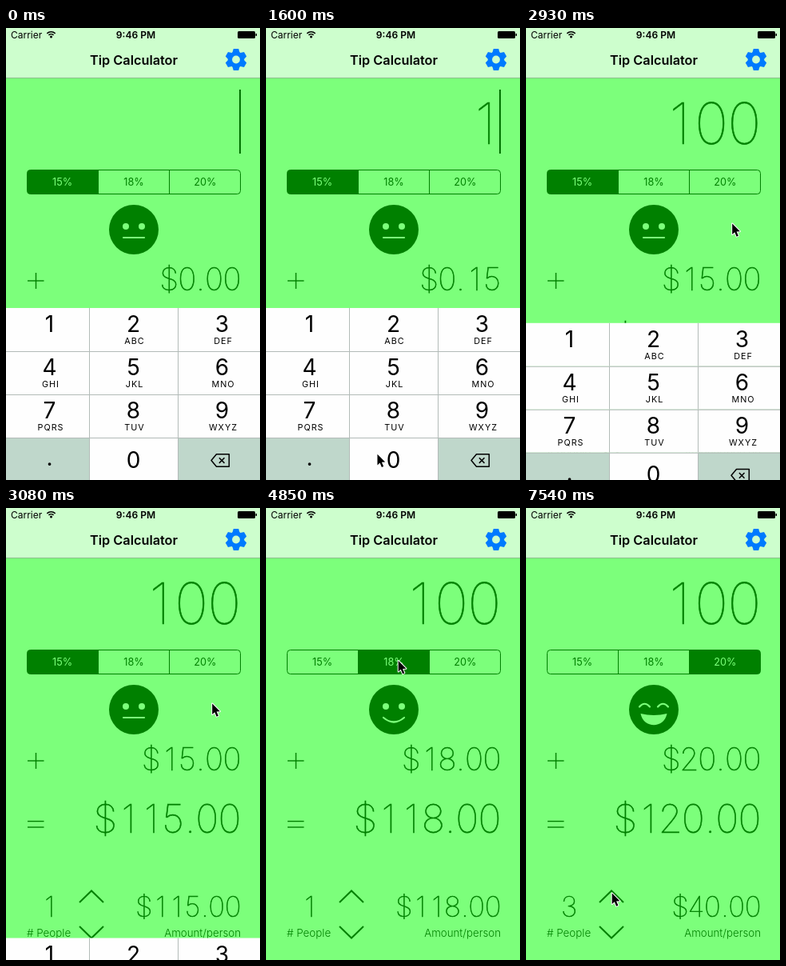
An HTML page with a canvas that plays this animation: 318 px wide and 565 px high, repeating every 8 s.

```html
<!DOCTYPE html>
<html lang="en">
<head>
<meta charset="utf-8">
<title>Tip Calculator</title>
<style>
html, body { margin: 0; width: 100%; height: 100%; overflow: hidden; background: #7cff7b; }
canvas { display: block; width: 318px; height: 565px; }
</style>
</head>
<body>
<canvas id="stage"></canvas>
<script>
const W = 318, H = 565, LOOP = 8000;
const BG = '#7cff7b', GREEN = '#008000', BAR = '#cdfecd', KEY = '#fefefe', GREY = '#bfd7cb', LINE = '#b3bbb8';
const RATES = [15, 18, 20];
const HOLD = 145, HOVER = 100, TRAVEL = 450, SLIDE = 400, KEYS_H = 216;
const canvas = document.getElementById('stage');
const ratio = window.devicePixelRatio || 1;
canvas.width = W * ratio;
canvas.height = H * ratio;
const c = canvas.getContext('2d');

// The whole session follows from these taps; a tap takes effect on release.
const taps = [
  { at: 1150, x: 61.5, y: 382, key: '1' },
  { at: 1750, x: 143, y: 540, key: '0' },
  { at: 2180, x: 143, y: 540, key: '0' },
  { at: 2922, x: 257.5, y: 243.5, dismiss: true },
  { at: 4270, x: 165, y: 190, segment: 1 },
  { at: 5450, x: 254, y: 189.5, segment: 2 },
  { at: 6640, x: 107, y: 480.5, more: true },
  { at: 7390, x: 107, y: 480.5, more: true }
];
const dismissAt = taps.find(p => p.dismiss).at;

const clamp = v => Math.min(1, Math.max(0, v));
const smooth = p => p * p * (3 - 2 * p);
const money = v => '$' + v.toFixed(2);

function stateAt(t) {
  const done = taps.filter(p => p.at + HOLD <= t);
  const typed = done.filter(p => p.key);
  const since = t - (typed.length ? typed[typed.length - 1].at + HOLD : 0);
  return {
    bill: typed.map(p => p.key).join(''),
    choice: done.reduce((last, p) => p.segment ?? last, 0),
    people: 1 + done.filter(p => p.more).length,
    touch: taps.find(p => p.at <= t && t < p.at + HOLD) || {},
    caret: t < dismissAt && since % 870 < 600,
    offset: KEYS_H * (1 - (1 - clamp((t - dismissAt) / SLIDE)) ** 4)
  };
}

// Glide to each tap shortly before it, never leaving the last one before release.
function pointerAt(t) {
  let x = -20, y = 447, free = 0;
  for (const p of taps) {
    const arrive = p.at - HOVER, start = Math.max(free, arrive - TRAVEL);
    const k = smooth(clamp((t - start) / (arrive - start)));
    x += (p.x - x) * k;
    y += (p.y - y) * k;
    free = p.at + HOLD;
  }
  return [x, y];
}

function text(str, x, y, size, weight, color, align = 'center', spacing = 0) {
  c.font = `${weight} ${size}px Inter, sans-serif`;
  c.letterSpacing = spacing + 'px';
  c.textAlign = align;
  c.fillStyle = color;
  c.fillText(str, x, y);
  c.letterSpacing = '0px';
}

function path(points, closed) {
  c.beginPath();
  points.forEach(([x, y]) => c.lineTo(x, y));
  if (closed) c.closePath();
}

function line(points, width, color, closed) {
  path(points, closed);
  c.lineWidth = width;
  c.strokeStyle = color;
  c.stroke();
}

function rect(x, y, w, h, color) {
  c.fillStyle = color;
  c.fillRect(x, y, w, h);
}

function disc(x, y, r, color) {
  c.beginPath();
  c.arc(x, y, r, 0, Math.PI * 2);
  c.fillStyle = color;
  c.fill();
}

// Thin tabular figures, centred by their ink in equal cells, set from the right.
function figures(str, right, y, size) {
  c.font = `100 ${size * 0.965}px Inter, sans-serif`;
  c.textAlign = 'left';
  c.fillStyle = c.strokeStyle = GREEN;
  c.lineWidth = 0.6;
  let x = right;
  for (const ch of [...str].reverse()) {
    const cell = size * (ch === '.' ? 0.278 : 0.556);
    const m = c.measureText(ch);
    const ink = (m.actualBoundingBoxRight - m.actualBoundingBoxLeft) / 2;
    const left = x - cell / 2 - ink;
    c.fillText(ch, left, y);
    c.strokeText(ch, left, y);
    x -= cell;
  }
}

function gear(x, y) {
  c.save();
  c.translate(x, y);
  disc(0, 0, 10.2, '#007aff');
  for (let i = 0; i < 6; i++) {
    path([[-4.8, -8], [-3.2, -13.4], [3.2, -13.4], [4.8, -8]], true);
    c.fill();
    c.rotate(Math.PI / 3);
  }
  disc(0, 0, 4.9, BAR);
  c.restore();
}

function header() {
  rect(0, 0, W, 62, BAR);
  rect(0, 62, W, 1, '#8cbd8c');
  text('Carrier', 6, 12.5, 12, 400, '#000', 'left');
  text('9:46 PM', 162.5, 12.5, 12.1, 600, '#000');
  c.strokeStyle = '#000';
  c.lineWidth = 1.6;
  for (const r of [4.3, 7.3]) {
    c.beginPath();
    c.arc(56.5, 12, r, -Math.PI * 0.75, -Math.PI * 0.25);
    c.stroke();
  }
  disc(56.5, 10.9, 1.5, '#000');
  c.beginPath();
  c.roundRect(290, 4, 22, 9, 1.5);
  c.fill();
  rect(312.5, 7, 1.5, 3, '#000');
  text('Tip Calculator', 160, 46, 16.3, 600, '#000');
  gear(288, 39.5);
}

function segments(selected, touched) {
  const left = 26, width = 268 / 3;
  c.beginPath();
  c.roundRect(left + 0.5, 177.5, 267, 30, 4);
  c.save();
  c.clip();
  RATES.forEach((rate, i) => {
    const x = left + width * i;
    if (i === selected) rect(x, 177, width, 31, GREEN);
    else if (i === touched) rect(x, 177, width, 31, 'rgba(0,128,0,.2)');
  });
  c.restore();
  c.lineWidth = 1;
  c.strokeStyle = GREEN;
  c.stroke();
  RATES.forEach((rate, i) => {
    const x = Math.floor(left + width * i) + 0.5;
    if (i) line([[x, 178], [x, 207]], 1, GREEN);
    text(rate + '%', left + width * (i + 0.5), 197, 12.7, 400, i === selected ? BG : GREEN);
  });
}

function face(mood) {
  disc(160, 252, 31, GREEN);
  c.strokeStyle = BG;
  c.lineWidth = 2.2;
  c.lineCap = 'round';
  for (const side of [-1, 1]) {
    if (mood < 2) disc(160 + side * 10, 248, 4, BG);
    else {
      const x = 160 + side * 11.5;
      c.beginPath();
      c.moveTo(x - 6.5, 248.5);
      c.quadraticCurveTo(x, 241, x + 6.5, 248.5);
      c.stroke();
    }
  }
  c.beginPath();
  if (mood === 2) {
    c.moveTo(143.5, 257);
    c.quadraticCurveTo(160, 261, 176.5, 257);
    c.bezierCurveTo(173, 276, 147, 276, 143.5, 257);
    c.fillStyle = BG;
    c.fill();
  } else {
    c.moveTo(147, 262);
    c.quadraticCurveTo(160, mood ? 273 : 262, 173, 262);
    c.stroke();
  }
  c.lineCap = 'butt';
}

function chevron(y, rise, color) {
  line([[92, y], [107, y - rise], [122, y]], 2, color);
}

function results(s) {
  const tip = s.bill * RATES[s.choice] / 100, total = +s.bill + tip;
  figures(s.bill, 294.3, 145, 74);
  if (s.caret) rect(292, 77, 2, 80, '#007400');
  segments(s.choice, s.touch.segment);
  face(s.choice);
  line([[37.5, 306], [37.5, 326]], 1.4, GREEN);
  for (const y of [316, 391.6, 399]) line([[27, y], [47.5, y]], 1.4, GREEN);
  figures(money(tip), 294.3, 327.5, 40.5);
  figures(money(total), 294.3, 406, 51);
  figures(String(s.people), 64, 511, 36.5);
  figures(money(total / s.people), 294.3, 511, 36.5);
  text('# People', 26, 535.5, 13.4, 300, GREEN, 'left');
  text('Amount/person', 294, 535.5, 13.3, 300, GREEN, 'right');
  chevron(493, 14.5, s.touch.more ? 'rgba(0,128,0,.4)' : GREEN);
  chevron(523, -14.5, GREEN);
}

function eraser() {
  c.lineJoin = 'round';
  line([[257, 540.5], [263.5, 532.8], [279.3, 532.8], [279.3, 548.3], [263.5, 548.3]], 1.5, '#000', true);
  for (const d of [-3.3, 3.3]) line([[270.2 - d, 537.3], [270.2 + d, 543.9]], 1.5, '#000');
  c.lineJoin = 'miter';
}

function keyboard(offset, down) {
  const cols = [0, 105, 216, W], mids = [54.5, 159.5, 270.5];
  const labels = '123456789.0<';
  const letters = ['', 'ABC', 'DEF', 'GHI', 'JKL', 'MNO', 'PQRS', 'TUV', 'WXYZ'];
  c.save();
  c.translate(0, offset);
  [...labels].forEach((label, i) => {
    const col = i % 3, row = Math.floor(i / 3);
    const x = cols[col], y = 350 + 54 * row, mid = mids[col];
    const grey = '.<'.includes(label) || label === down;
    rect(x, y, cols[col + 1] - x, 54, grey ? GREY : KEY);
    if (row) rect(x, y, W - x, 1, LINE);
    if (col) rect(x - 1, y, 1, 54, LINE);
    if (label === '<') eraser();
    else text(label, mid, y + (label === '.' ? 35 : row === 3 ? 37.5 : 30), 28, 400, '#000');
    if (letters[i]) text(letters[i], mid + 1.5, y + 45.3, 10.8, 400, '#000', 'center', 1);
  });
  c.restore();
}

function arrow(x, y) {
  c.save();
  c.translate(x + 0.7, y + 1);
  c.lineJoin = 'round';
  const shape = [[0, 0], [0, 13.6], [3.1, 10.8], [5.4, 16.2], [7.7, 15.2], [5.4, 10], [9.7, 9.8]];
  line(shape, 2, '#fff', true);
  c.fillStyle = '#000';
  c.fill();
  c.restore();
}

function draw(t) {
  const s = stateAt(t);
  c.setTransform(ratio, 0, 0, ratio, 0, 0);
  rect(0, 0, W, H, BG);
  header();
  results(s);
  if (s.offset < KEYS_H) keyboard(s.offset, s.touch.key);
  arrow(...pointerAt(t));
}

function tick() {
  draw(performance.now() % LOOP);
  requestAnimationFrame(tick);
}
tick();
</script>
</body>
</html>
```
